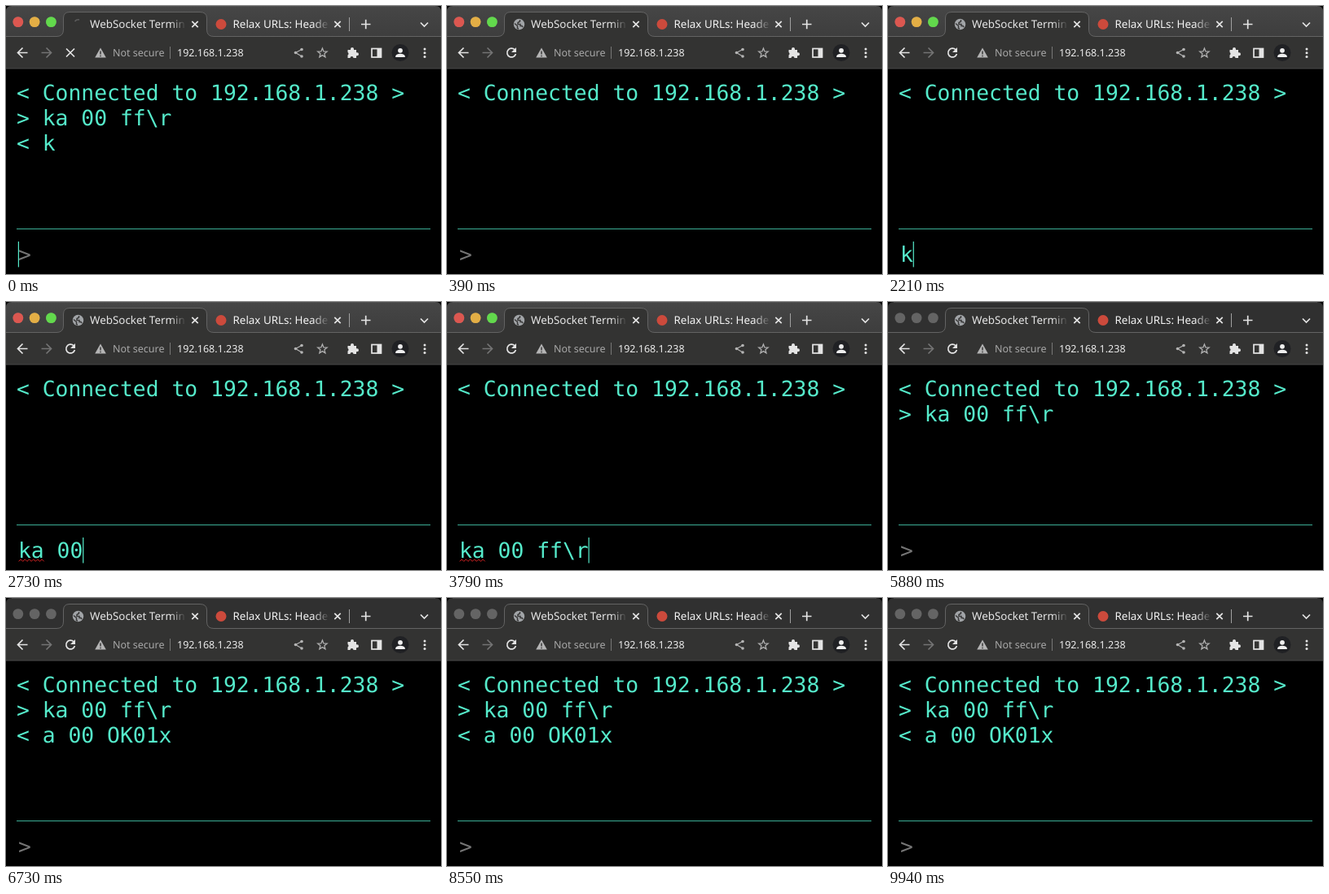
These frames come from a looping animation (534x330 px, 10000 ms). An HTML page:

```html
<!DOCTYPE html>
<html lang="en">
<head>
<meta charset="utf-8">
<title>Terminal</title>
<style>
  html, body { margin: 0; width: 100%; height: 100%; overflow: hidden; background: #000; }
  svg { display: block; width: 534px; height: 330px; text-rendering: geometricPrecision; }
  .ui { font-family: "Noto Sans", "Open Sans", sans-serif; }
  .title { font-size: 13.4px; }
  .address { font-size: 12.5px; }
  .mono { font: 26.36px "DejaVu Sans Mono", monospace; fill: #55eaca; white-space: pre; }
  .line { fill: none; stroke: #e4e4e4; stroke-width: 1.7; }
  .dim { stroke: #747474; }
  .soft { stroke: #b0b0b0; stroke-width: 1.3; }
</style>
</head>
<body>
<svg viewBox="0 0 534 330">
  <defs>
    <linearGradient id="bar" x2="0" y2="1">
      <stop offset="0" stop-color="#464646"/><stop offset="1" stop-color="#3d3d3d"/>
    </linearGradient>
    <linearGradient id="fade">
      <stop offset=".84" stop-color="#fff"/><stop offset="1" stop-color="#000"/>
    </linearGradient>
    <mask id="fade1" maskUnits="userSpaceOnUse" x="100" y="8" width="121" height="28">
      <rect x="100" y="8" width="121" height="28" fill="url(#fade)"/>
    </mask>
    <mask id="fade2" maskUnits="userSpaceOnUse" x="273" y="8" width="124" height="28">
      <rect x="273" y="8" width="124" height="28" fill="url(#fade)"/>
    </mask>
    <path id="close" class="line" d="M-3.7-3.7 3.7 3.7M3.7-3.7-3.7 3.7"/>
    <path id="arrow" d="M6 0H-5.5M0-6-6 0 0 6"/>
  </defs>

  <path d="M0 40V7Q0 0 7 0H527Q534 0 534 7V40Z" fill="#303030"/>
  <path id="activeBar" d="M0 40V7Q0 0 7 0H527Q534 0 534 7V40Z" fill="url(#bar)"/>
  <path d="M7 .5H527" stroke="#5a5a5a" opacity=".5"/>
  <path d="M0 37.5H62Q70.500 37.500 70.500 29V15Q70.500 7.500 78 7.500H238Q246.500 7.500 246.500 15V29Q246.500 37.500 255 37.500H534V77H0Z" fill="#333332"/>
  <path d="M0 37.500H62Q70.500 37.500 70.500 29V15Q70.500 7.500 78 7.500H238Q246.500 7.500 246.500 15V29Q246.500 37.500 255 37.500H534" fill="none" stroke="#636363"/>
  <path d="M0 77H534" stroke="#484848"/>
  <g id="lights"></g>

  <g id="globe" transform="translate(88.500 22.500)">
    <circle r="6.700" fill="#a2a5a8"/>
    <path d="M-5.500-1 -2 2V5L-.5 5.500M1-5.500V-3.500L-1.500-2V0H1.500V2H3.500L4.500 3.500" fill="none" stroke="#3a3a3a" stroke-width="1.500"/>
  </g>
  <path id="spinner" d="M84.500 19A5.500 5.500 0 0 1 90 17" fill="none" stroke="#5c5c5c" stroke-width="1.500"/>
  <g class="ui title" fill="#e6e6e6">
    <g mask="url(#fade1)"><text x="103" y="27">WebSocket Termin</text></g>
    <g mask="url(#fade2)"><text x="278.500" y="27" fill="#f4f4f4">Relax URLs: Header</text></g>
  </g>
  <circle cx="264" cy="22.500" r="6.500" fill="#cc4a3c"/>
  <use href="#close" x="232" y="22.500"/>
  <use href="#close" x="407" y="22.500"/>
  <path d="M421.500 14V31" stroke="#a0a0a0"/>
  <path class="line" d="M436 22.500H447.500M441.700 16.700V28.200M509 20.500 513.500 25 518 20.500"/>

  <use href="#arrow" class="line" x="20.500" y="57.500"/>
  <use href="#arrow" class="line dim" transform="translate(49.500 57.500) scale(-1 1)"/>
  <path id="stop" class="line" d="M74 52.500 84 62.500M84 52.500 74 62.500"/>
  <g id="reload">
    <path class="line" d="M83 53.700A5.400 5.400 0 1 0 84.400 59"/>
    <path d="M85 51V57H79Z" fill="#e4e4e4"/>
  </g>
  <path d="M116 51.500 122.800 63.500H109.200Z" fill="#b4b4b4"/>
  <path d="M116 55.500V59.500M116 60.700V62.200" stroke="#333" stroke-width="1.400"/>
  <g class="ui address">
    <text x="131" y="62" fill="#a8a8a8">Not secure</text>
    <text x="210" y="62" fill="#ececec">192.168.1.238</text>
  </g>
  <path d="M201.500 50V65" stroke="#777"/>

  <path class="line soft" d="M363 53.500 355.500 57.500 363 62"/>
  <g fill="#b4b4b4"><circle cx="363" cy="53.500" r="1.800"/><circle cx="355.500" cy="57.500" r="1.800"/><circle cx="363" cy="62" r="1.800"/></g>
  <path id="star" class="line soft"/>
  <path d="M419.500 54H423V53A2 2 0 0 1 427 53V54H430V57.300H431A2 2 0 0 1 431 61.300H430V64H426.500A2 2 0 0 0 422.500 64H419.500V60.500A2 2 0 0 0 419.500 57Z" fill="#e4e4e4"/>
  <rect class="line" x="449" y="52.500" width="11.500" height="10.500"/>
  <path d="M455.500 52H461V63.500H455.500Z" fill="#e4e4e4"/>
  <circle cx="484" cy="57.500" r="10.500" fill="#202124"/>
  <g fill="#eee"><circle cx="484" cy="54.800" r="2.900"/><path d="M478.200 63V61.500Q479.500 58.800 484 58.800T489.800 61.500V63Z"/></g>
  <g fill="#e4e4e4"><circle cx="514" cy="53" r="1.500"/><circle cx="514" cy="57.700" r="1.500"/><circle cx="514" cy="62.400" r="1.500"/></g>

  <g class="mono">
    <text id="row0" x="13" y="116"></text>
    <text id="row1" x="13" y="147"></text>
    <text id="row2" x="13" y="178"></text>
    <text id="entry" x="15" y="315"></text>
  </g>
  <path d="M13 274.500H521" stroke="#3cae96"/>
  <path id="squiggle" fill="none" stroke="#d42222"/>
  <rect id="caret" y="290" width="1.200" height="31.500" fill="#55eaca"/>
</svg>
<script>
const LOOP = 10000, ADVANCE = 15.87;
const COMMAND = "ka 00 ff\\r", REPLY = "< a 00 OK01x";
const KEY_TIMES = [2210, 2330, 2450, 2600, 2730, 3000, 3120, 3240, 3390, 3790];
const REPLY_STEPS = [[6550, 3], [6610, 6], [6670, 9], [6730, 12]];
const RELOADED = 60, READY = 240, CONNECTED = 300, FOCUSED = 1610, SENT = 5700, BLURRED = 5760;

const $ = id => document.getElementById(id);
const show = (id, on) => $(id).setAttribute("visibility", on ? "visible" : "hidden");
const within = (t, from, to) => t >= from && t < to;
const setText = (id, text) => { if ($(id).textContent !== text) $(id).textContent = text; };

const lights = ["#dc5750", "#e3ae45", "#62d94c"].map((color, i) => {
  const make = fill => {
    const dot = document.createElementNS("http://www.w3.org/2000/svg", "circle");
    Object.entries({ cx: 14.8 + 20.3 * i, cy: 19.6, r: 6.4, fill })
      .forEach(([key, value]) => dot.setAttribute(key, value));
    return $("lights").appendChild(dot);
  };
  make("#646464");
  return make(color);
});

const starPoints = Array.from({ length: 10 }, (_, i) => {
  const radius = i % 2 ? 2.6 : 6, angle = Math.PI * (i / 5 - 0.5);
  return [388.4 + radius * Math.cos(angle), 58 + radius * Math.sin(angle)];
});
$("star").setAttribute("d", "M" + starPoints.join("L") + "Z");

const wave = Array.from({ length: 13 }, (_, i) => [15.5 + 2.6 * i, i % 2 ? 316.8 : 319.4]);
$("squiggle").setAttribute("d", "M" + wave.join("L"));

function update(t) {
  const focus = 1 - Math.min(1, Math.max(0, (t - BLURRED) / 120));
  $("activeBar").setAttribute("opacity", focus);
  lights.forEach(dot => dot.setAttribute("opacity", focus));

  const ready = t >= READY;
  show("globe", ready);
  show("reload", ready);
  show("spinner", !ready);
  show("stop", !ready);

  const stale = t < RELOADED;
  const replied = REPLY_STEPS.reduce((count, [at, n]) => t >= at ? n : count, 0);
  setText("row0", stale || t >= CONNECTED ? "< Connected to 192.168.1.238 >" : "");
  setText("row1", stale || t >= SENT ? "> " + COMMAND : "");
  setText("row2", stale ? "< k" : REPLY.slice(0, replied));

  const typed = t < SENT ? KEY_TIMES.filter(at => t >= at).length : 0;
  setText("entry", typed ? COMMAND.slice(0, typed) : ">");
  $("entry").style.fill = typed ? "" : "#757575";
  show("squiggle", typed > 2);
  $("caret").setAttribute("x", 14.8 + typed * ADVANCE);
  show("caret", stale || within(t, FOCUSED, 4390) || within(t, 4880, 5550));
}

const start = performance.now();
function frame() {
  update((performance.now() - start) % LOOP);
  requestAnimationFrame(frame);
}
frame();
</script>
</body>
</html>
```
